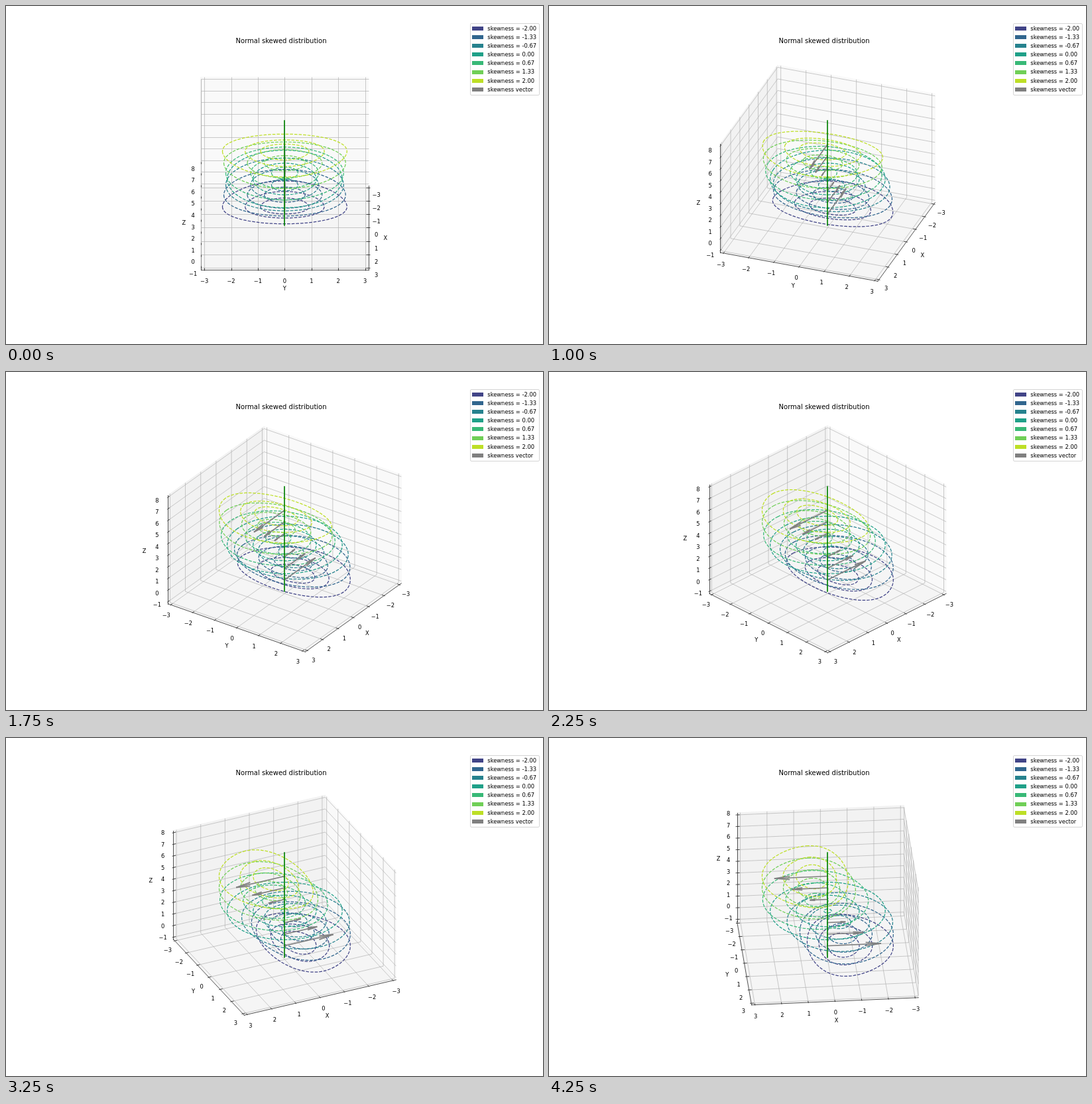
An HTML page for the animation above (4.5 s loop, 810 by 510 pixels).

```html
<!DOCTYPE html>
<html lang="en">
<head>
<meta charset="utf-8">
<title>Normal skewed distribution</title>
<style>
  html, body { margin: 0; width: 100%; height: 100%; overflow: hidden; background: #fff; }
  svg { display: block; width: 810px; height: 510px; }
  text { font: 8.333px "DejaVu Sans", sans-serif; fill: #000; }
  .title { font-size: 10px; }
  .mid { text-anchor: middle; }
  polyline, .ring { fill: none; }
  .grid { stroke: #b0b0b0; stroke-width: .667; }
  .axis { stroke: #000; stroke-width: .667; stroke-linecap: square; }
  .tick { stroke: #000; stroke-width: .667; }
  .ring { stroke-width: 1.25; stroke-dasharray: 4.63 2; }
  .arrow { stroke: #808080; stroke-width: 1.67; }
  .stem { stroke: #008000; stroke-width: 1.67; stroke-linecap: square; }
</style>
</head>
<body>
<svg viewBox="0 0 810 510">
  <g id="plot"></g>
  <text class="title mid" x="415.1" y="56.2">Normal skewed distribution</text>
  <g id="legend"></g>
</svg>
<script>
const STEP = 250, FRAMES = 18, TURN = 5;
const CX = 420.4, CY = 252.25;          // screen centre of the box
const UNIT = 40.43, RISE = 17.51;       // px per x/y unit, px per z unit
const H = 3.125, LOW = -1.1875, TOP = 8.1875, MID = 3.5;
const PAD = 0.586, LABEL_PAD = 1.273;   // tick and axis label offsets
const D = [0.5, 0.5, 0.75];

const COLORS = ['#414487', '#31668e', '#26828e', '#1fa088', '#38b977', '#70cf57', '#bddf26'];
const LEVELS = [0.1, 0.5, 0.99];        // share of the unskewed peak
const SKEWS = COLORS.map((_, i) => -2 + i * 2 / 3);
const XY_TICKS = [-3, -2, -1, 0, 1, 2, 3];
const Z_TICKS = [-1, 0, 1, 2, 3, 4, 5, 6, 7, 8];

// Normal cumulative distribution
function cdf(x) {
  const t = 1 / (1 + 0.2316419 * Math.abs(x));
  const poly = t * (0.31938153 + t * (-0.356563782 + t * (1.781477937 + t * (-1.821255978 + t * 1.330274429))));
  const tail = poly * Math.exp(-x * x / 2) / Math.sqrt(2 * Math.PI);
  return x > 0 ? 1 - tail : tail;
}

const logDensity = (x, y, s) => Math.log(2 * cdf(s * x)) - (x * x + y * y) / 2;

function mode(s) {
  let a = -2, b = 2;
  for (let i = 0; i < 60; i++) {
    const p = a + (b - a) / 3, q = b - (b - a) / 3;
    if (logDensity(p, 0, s) < logDensity(q, 0, s)) a = p; else b = q;
  }
  return (a + b) / 2;
}

// Contour of the skewed density, traced by rays from its mode
function ring(s, level, z) {
  const c = mode(s), goal = Math.log(level), points = [], n = 120;
  for (let i = 0; i < n; i++) {
    const a = -Math.PI / 2 + i / n * 2 * Math.PI;
    const dx = Math.cos(a), dy = Math.sin(a);
    let near = 0, far = 4;
    for (let k = 0; k < 30; k++) {
      const r = (near + far) / 2;
      if (logDensity(c + r * dx, r * dy, s) > goal) near = r; else far = r;
    }
    points.push([c + near * dx, near * dy, z]);
  }
  return points;
}

const rings = SKEWS.flatMap((s, i) =>
  LEVELS.map(level => ({ color: COLORS[i], points: ring(s, level, i) })));

function arrowLines(s, z) {
  const a = Math.PI / 12, back = s - 0.3 * s * Math.cos(a), up = 0.3 * s * Math.sin(a);
  return [
    [[0, 0, z], [s, 0, z]],
    [[s, 0, z], [back, 0, z + up]],
    [[s, 0, z], [back, 0, z - up]]
  ];
}
const arrows = SKEWS.flatMap((s, i) => Math.abs(s) < 0.01 ? [] : arrowLines(s, i));

// One entry per axis: edge point, tick direction, outward signs, grid path
const axes = [
  { name: 'X', ticks: XY_TICKS, edge: [0, H, LOW], dir: 1, out: [0, 1, -1], span: [-H, H],
    grid: v => [[v, -H, TOP], [v, -H, LOW], [v, H, LOW]] },
  { name: 'Y', ticks: XY_TICKS, edge: [H, 0, LOW], dir: 0, out: [1, 0, -1], span: [-H, H],
    grid: v => [[-H, v, TOP], [-H, v, LOW], [H, v, LOW]] },
  { name: 'Z', ticks: Z_TICKS, edge: [H, -H, MID], dir: 0, out: [1, -1, 0], span: [LOW, TOP],
    grid: v => [[H, -H, v], [-H, -H, v], [-H, H, v]] }
];

const panes = [
  ['#f9f9f9', [[-H, -H, LOW], [-H, H, LOW], [-H, H, TOP], [-H, -H, TOP]]],
  ['#f2f2f2', [[-H, -H, LOW], [H, -H, LOW], [H, -H, TOP], [-H, -H, TOP]]],
  ['#f5f5f5', [[-H, -H, LOW], [H, -H, LOW], [H, H, LOW], [-H, H, LOW]]]
];

let cos = 1, sin = 0;
const project = ([x, y, z]) => [
  CX + UNIT * (y * cos - x * sin),
  CY + UNIT / 2 * (x * cos + y * sin) - RISE * (z - MID)
];

// Straight horizontal and vertical strokes sit on whole pixels
function snap(pts, shift) {
  const square = pts.every((p, i) => !i ||
    Math.abs(p[0] - pts[i - 1][0]) < 1e-3 || Math.abs(p[1] - pts[i - 1][1]) < 1e-3);
  return square ? pts.map(p => p.map(v => Math.floor(v + 0.5) + shift)) : pts;
}

const list = pts => pts.map(p => p.map(v => v.toFixed(2)).join()).join(' ');
const line = (cls, pts, shift = 0.5) =>
  `<polyline class="${cls}" points="${list(snap(pts.map(project), shift))}"/>`;
const put = (p, i, v) => p.map((old, k) => k === i ? v : old);
const push = (p, out, amount) => p.map((v, k) => v + out[k] * amount * D[k]);
const minus = v => String(v).replace('-', '\u2212');

function label(p, drop, str) {
  const [x, y] = project(p);
  return `<text class="mid" x="${x.toFixed(2)}" y="${(y + drop).toFixed(2)}">${str}</text>`;
}

function drawAxis({ name, ticks, edge, dir, out, span, grid }, i) {
  let s = line('axis', span.map(v => put(edge, i, v)));
  s += ticks.map(v => line('grid', grid(v))).join('');
  for (const v of ticks) {
    const p = put(edge, i, v);
    s += line('tick', [0.05, -0.1].map(d => put(p, dir, p[dir] + d * out[dir])));
    s += label(push(p, out, PAD), 6.4, minus(v));
  }
  return s + label(push(edge, out, LABEL_PAD), 2.2, name);
}

function draw(azimuth) {
  cos = Math.cos(azimuth * Math.PI / 180);
  sin = Math.sin(azimuth * Math.PI / 180);
  let s = panes.map(([c, pts]) =>
    `<polygon fill="${c}" stroke="${c}" stroke-width=".8" points="${list(pts.map(project))}"/>`).join('');
  s += axes.map(drawAxis).join('');
  s += rings.map(r =>
    `<polygon class="ring" stroke="${r.color}" points="${list(r.points.map(project))}"/>`).join('');
  s += arrows.map(a => line('arrow', a)).join('');
  s += line('stem', [[0, 0, -1], [0, 0, 8]], 0);
  document.getElementById('plot').innerHTML = s;
}

function drawLegend() {
  const rows = SKEWS.map((s, i) => ['skewness = ' + s.toFixed(2).replace('-0.00', '0.00'), COLORS[i]]);
  rows.push(['skewness vector', '#808080']);
  document.getElementById('legend').innerHTML =
    '<rect x="700.5" y="26.5" width="104" height="108" rx="1.67" fill="#fff" fill-opacity=".8" stroke="#ccc" stroke-width=".83"/>' +
    rows.map(([str, color], i) => {
      const y = 36.5 + 13.17 * i;
      return `<rect x="703" y="${Math.round(y - 5.83)}" width="17" height="6" fill="${color}"/>` +
        `<text x="726.3" y="${y.toFixed(2)}">${str}</text>`;
    }).join('');
}

drawLegend();
const start = performance.now();
let shown = -1;
function tick() {
  const k = Math.floor((performance.now() - start) / STEP) % FRAMES;
  if (k !== shown) draw(TURN * (shown = k));
  requestAnimationFrame(tick);
}
tick();
</script>
</body>
</html>
```
